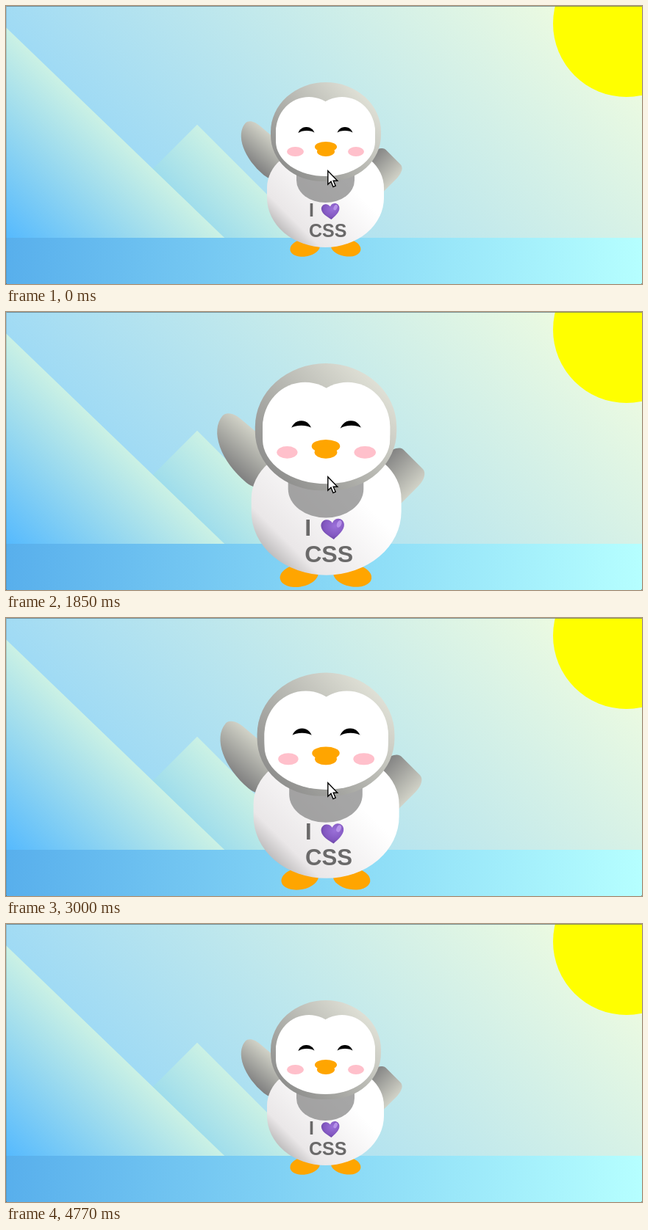
An HTML page for the animation above (4930 ms loop, 865x379 px).

```html
<!DOCTYPE html>
<html lang="en">
<head>
<meta charset="utf-8">
<title>Waving penguin</title>
<style>
  :root { --skin: gray; --face: white; --beak: orange; }
  html, body { margin: 0; width: 100%; height: 100%; overflow: hidden; background: #111; }

  .stage { position: relative; width: 865px; height: 379px; overflow: hidden; border-radius: 0 0 2px 2px; }
  .stage::after {
    content: ""; position: absolute; inset: 0; z-index: 5;
    border-top: 1px solid rgba(85, 105, 115, .65);
    border-left: 1px solid rgba(85, 105, 115, .3);
  }
  .page {
    position: absolute; top: -1px; left: 0; width: 869px; height: 455px;
    background: linear-gradient(45deg, rgb(118, 201, 255), rgb(247, 255, 222));
  }
  .page * { position: absolute; }

  .mountain { width: 300px; height: 300px; }
  .mountain.front {
    top: 175px; left: 0; z-index: 2; transform: skewY(44deg);
    background: linear-gradient(rgb(203, 241, 228), rgb(80, 183, 255));
  }
  .mountain.back {
    top: 225px; left: 110px; z-index: 1; transform: rotate(45deg);
    background: linear-gradient(rgb(203, 241, 228), rgb(47, 170, 255));
  }
  .sun { top: -75px; right: -75px; width: 200px; height: 200px; border-radius: 50%; background: yellow; }
  .ground {
    top: 317px; left: 0; width: 100%; height: 80px; z-index: 3;
    background: linear-gradient(90deg, rgb(88, 175, 236), rgb(182, 255, 255));
  }

  .penguin { top: 75px; left: 284.5px; width: 300px; height: 300px; z-index: 4; transform: scale(1); }
  .head {
    top: 10%; left: 25%; width: 50%; height: 45%; z-index: 1;
    border-radius: 70% 70% 65% 65%;
    background: linear-gradient(45deg, var(--skin), rgb(239, 240, 228));
  }
  .cheek { top: 15%; width: 60%; height: 70%; border-radius: 70% 70% 60% 60%; background: var(--face); }
  .cheek.left { left: 5%; }
  .cheek.right { right: 5%; }
  .chin { top: 25%; left: 5%; width: 90%; height: 70%; border-radius: 70% 70% 100% 100%; background: var(--face); }
  .eye { top: 45%; width: 15%; height: 17%; border-radius: 50%; background: black; }
  .eye.left { left: 25%; }
  .eye.right { right: 25%; }
  .lid { top: 25%; left: -23%; width: 150%; height: 100%; border-radius: 50%; background: var(--face); }
  .blush { top: 65%; width: 15%; height: 10%; border-radius: 50%; background: pink; }
  .blush.left { left: 15%; }
  .blush.right { right: 15%; }
  .beak { height: 10%; border-radius: 50%; background: var(--beak); }
  .beak.top { top: 60%; left: 40%; width: 20%; }
  .beak.bottom { top: 65%; left: 42%; width: 16%; }

  .shirt {
    top: 189.5px; left: 127.5px; z-index: 1; margin: 0; white-space: pre;
    font: bold 25px/28.5px "Liberation Sans", Helvetica, Arial, sans-serif; color: #6a6969;
  }
  .heart { top: 193.5px; left: 143.5px; width: 27px; height: 24px; z-index: 1; overflow: visible; }

  .body {
    top: 40%; left: 23.5%; width: 53%; height: 45%;
    border-radius: 80% 80% 100% 100%;
    background: linear-gradient(45deg, rgb(134, 133, 133) 0%, rgb(234, 231, 232) 25%, white 67%);
  }
  .bib { top: 10%; left: 25%; width: 50%; height: 45%; border-radius: 0 0 100% 100%; background: var(--skin); opacity: .7; }
  .arm {
    width: 30%; height: 60%; z-index: -1; border-radius: 30% 30% 30% 120%;
    background: linear-gradient(90deg, var(--skin), rgb(209, 210, 199));
  }
  .arm.left { top: 35%; left: 5%; transform-origin: top left; transform: rotate(130deg) scaleX(-1); }
  .arm.right { top: 0; right: -5%; transform: rotate(45deg); }
  .foot { top: 85%; width: 15%; height: 30%; z-index: -1; border-radius: 50%; background: var(--beak); }
  .foot.left { left: 25%; transform: rotate(80deg); }
  .foot.right { right: 25%; transform: rotate(-80deg); }

  .cursor { position: absolute; top: 0; left: 0; width: 16px; height: 25px; z-index: 6; overflow: visible; }
</style>
</head>
<body>
<div class="stage">
  <div class="page">
    <div class="mountain front"></div>
    <div class="mountain back"></div>
    <div class="sun"></div>
    <div class="penguin">
      <div class="head">
        <div class="cheek left"></div>
        <div class="cheek right"></div>
        <div class="chin"></div>
        <div class="eye left"><div class="lid"></div></div>
        <div class="eye right"><div class="lid"></div></div>
        <div class="blush left"></div>
        <div class="blush right"></div>
        <div class="beak top"></div>
        <div class="beak bottom"></div>
      </div>
      <p class="shirt">I
CSS</p>
      <svg class="heart" viewBox="0 0 27 24">
        <defs>
          <radialGradient id="purple" cx=".6" cy=".35" r=".7">
            <stop offset="0" stop-color="#9a70d8"/>
            <stop offset=".65" stop-color="#8459c2"/>
            <stop offset="1" stop-color="#6843a2"/>
          </radialGradient>
        </defs>
        <g transform="rotate(-5 13.5 12)">
          <path fill="url(#purple)" d="M13.5 23C9 19.5 1.2 14.5 1.2 8C1.2 4.2 4 1.6 7.3 1.6C10 1.6 12.3 3 13.5 5.6C14.7 3 17 1.6 19.7 1.6C23 1.6 25.8 4.2 25.8 8C25.8 14.5 18 19.5 13.5 23Z"/>
          <ellipse cx="20.6" cy="7.2" rx="2.4" ry="4" fill="#c19df0" opacity=".8" transform="rotate(28 20.6 7.2)"/>
        </g>
      </svg>
      <div class="body">
        <div class="bib"></div>
        <div class="arm left"></div>
        <div class="arm right"></div>
        <div class="foot left"></div>
        <div class="foot right"></div>
      </div>
    </div>
    <div class="ground"></div>
  </div>
  <svg class="cursor" viewBox="0 0 16 25">
    <path d="M.8 .8V19.2L5 15.3L8 22.6L11.2 21.2L8.2 14.2H13.8Z" fill="white" stroke="black" stroke-width="1.4"/>
  </svg>
</div>
<script>
  const LOOP = 4930, FPS = 13;
  const WAVE_START = 535, WAVE_PERIOD = 3000, SWING = 300;
  const PRESS = 1308, RELEASE = 2495, GROW = 1000;
  const LEAVE = 3385, LEAVE_TIME = 385;

  const penguin = document.querySelector(".penguin");
  const arm = document.querySelector(".arm.left");
  const cursor = document.querySelector(".cursor");
  const clamp = v => Math.min(1, Math.max(0, v));

  // cubic-bezier(.42, 0, .58, 1)
  function easeInOut(x) {
    x = clamp(x);
    let lo = 0, hi = 1;
    for (let i = 0; i < 20; i++) {
      const u = (lo + hi) / 2, v = 1 - u;
      if (3 * v * v * u * .42 + 3 * v * u * u * .58 + u ** 3 < x) lo = u; else hi = u;
    }
    return lo * lo * (3 - 2 * lo);
  }

  // Two swings down and up, then rest until the next period
  function armAngle(t) {
    const w = (t - WAVE_START) % WAVE_PERIOD;
    if (w < 0 || w > 4 * SWING) return 130;
    const phase = w / SWING % 2;
    return 130 - 20 * (1 - Math.abs(1 - phase));
  }

  function draw(now) {
    // The motion advances in 13 even steps per second
    const t = Math.floor((now % LOOP + 5) * FPS / 1000) * 1000 / FPS;
    const grown = easeInOut((t - PRESS) / GROW) - easeInOut((t - RELEASE) / GROW);
    const gone = clamp((t - LEAVE) / LEAVE_TIME) ** 2;

    penguin.style.transform = `scale(${1 + grown / 2})`;
    arm.style.transform = `rotate(${armAngle(t)}deg) scaleX(-1)`;
    cursor.style.transform = `translate(${437 - 406 * gone}px, ${224 - 254 * gone}px)`;
    requestAnimationFrame(draw);
  }
  requestAnimationFrame(draw);
</script>
</body>
</html>
```
